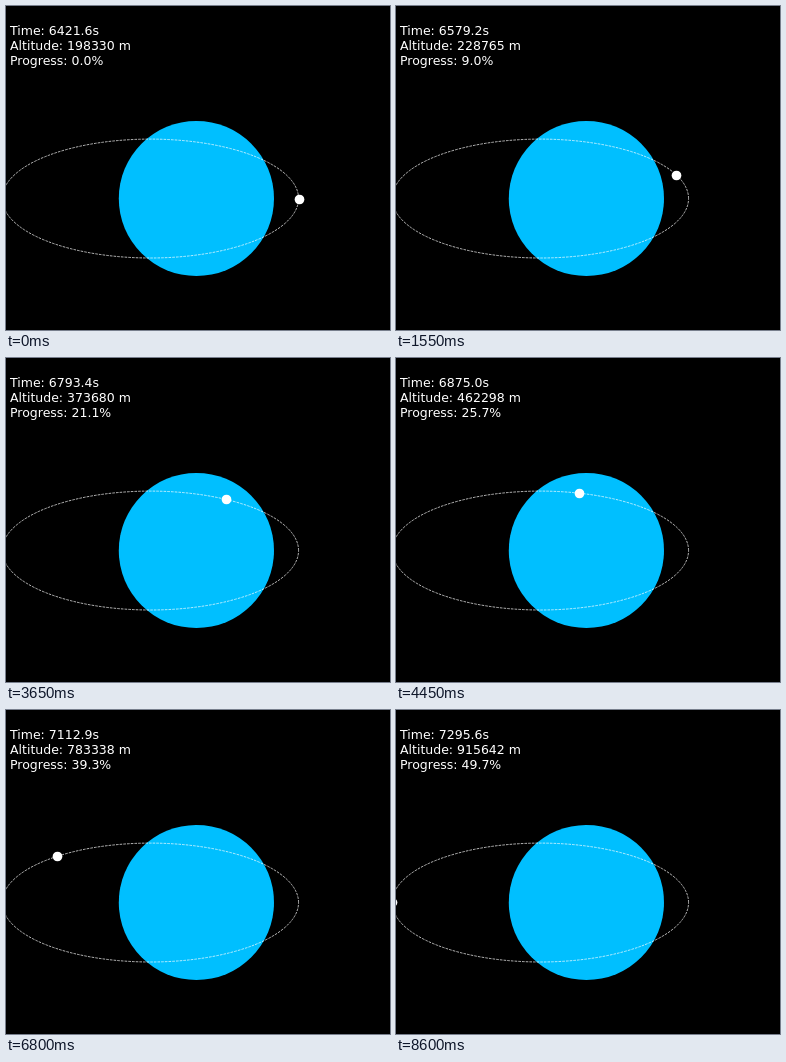
An HTML page that plays this animation: 384 px wide and 324 px high, repeating every 8.65 s.

```html
<!DOCTYPE html>
<html lang="en">
<head>
<meta charset="utf-8">
<title>Orbit</title>
<style>
  html, body { margin: 0; width: 100%; height: 100%; overflow: hidden; background: #000; }
  svg { display: block; }
  text { font: 12.5px "DejaVu Sans", sans-serif; fill: #fff; white-space: pre; }
</style>
</head>
<body>
<svg width="384" height="324" viewBox="0 0 384 324">
  <rect width="384" height="324" fill="#000"/>
  <circle cx="190.4" cy="192.5" r="77.6" fill="#00bfff"/>
  <path id="orbit" fill="none" stroke="#fff" stroke-width="0.7" stroke-dasharray="2.57 1.11"/>
  <circle id="satellite" r="4.86" fill="#fff"/>
  <text id="time" x="4" y="29"></text>
  <text id="altitude" x="4" y="44"></text>
  <text id="progress" x="4" y="59"></text>
</svg>
<script>
const STEP_MS = 50, STEPS = 173, SAMPLES = 346;
const BODY_RADIUS = 600000, SEMI_MAJOR = 1157000, ECC = 0.31;
const view = { cx: 144.36, cy: 192.55, a: 148.2, b: 59.45 };
// Mission clock: [step, seconds]
const clock = [[0, 6421.6], [31, 6579.2], [56, 6706.8], [89, 6875],
               [110, 6981.3], [136, 7112.9], [172, 7295.6]];

const el = id => document.getElementById(id);
const parts = { satellite: el('satellite'), time: el('time'),
                altitude: el('altitude'), progress: el('progress') };

const { cx, cy, a, b } = view;
el('orbit').setAttribute('d',
  `M${cx + a} ${cy}A${a} ${b} 0 0 0 ${cx - a} ${cy}A${a} ${b} 0 0 0 ${cx + a} ${cy}`);

function clockAt(step) {
  const i = Math.max(1, clock.findIndex(([s]) => s >= step));
  const [s0, t0] = clock[i - 1], [s1, t1] = clock[i];
  return t0 + (t1 - t0) * (step - s0) / (s1 - s0);
}

function render(ms) {
  const step = Math.floor((ms % (STEP_MS * STEPS)) / STEP_MS);
  const trueAnomaly = 2 * Math.PI * step / (SAMPLES - 1);
  const ecc = 2 * Math.atan(Math.sqrt((1 - ECC) / (1 + ECC)) * Math.tan(trueAnomaly / 2));
  const altitude = SEMI_MAJOR * (1 - ECC * Math.cos(ecc)) - BODY_RADIUS;

  // The marker sits on whole pixels.
  parts.satellite.setAttribute('cx', Math.round(cx + a * Math.cos(ecc)) + 0.5);
  parts.satellite.setAttribute('cy', Math.round(cy - b * Math.sin(ecc)) + 0.5);
  parts.time.textContent = `Time: ${clockAt(step).toFixed(1)}s`;
  parts.altitude.textContent = `Altitude: ${altitude.toFixed(0)} m`;
  parts.progress.textContent = `Progress: ${(100 * step / SAMPLES).toFixed(1)}%`;
}

const start = performance.now();
function tick() {
  render(performance.now() - start);
  requestAnimationFrame(tick);
}
tick();
</script>
</body>
</html>
```
